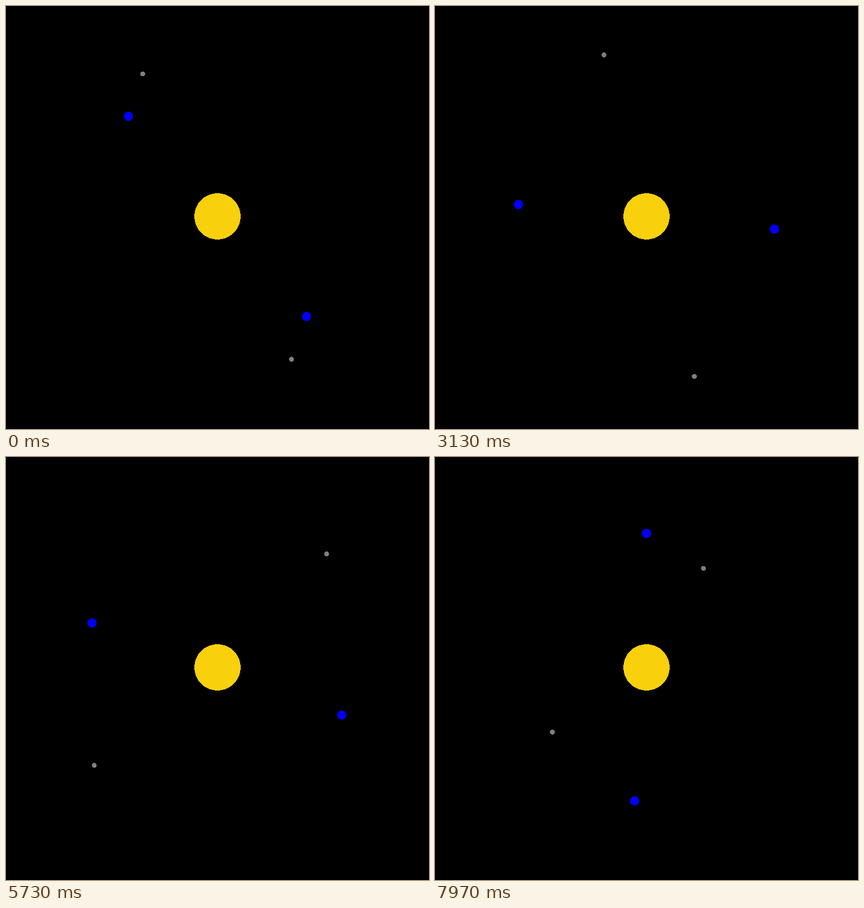
Write an HTML page that moves like this. It is 748 by 748 pixels and loops after 8000 ms.

```html
<!DOCTYPE html>
<html lang="en">
<head>
<meta charset="utf-8">
<title>Orbits</title>
<style>
  html, body { margin: 0; height: 100%; overflow: hidden; background: #000; }
  svg { display: block; width: 100%; height: 100%; }
</style>
</head>
<body>
<svg viewBox="0 0 748 748" shape-rendering="crispEdges">
  <circle cx="374" cy="372" r="41" fill="#f8d00c"/>
</svg>
<script>
const LOOP = 8000;
const TAU = 2 * Math.PI;
const SUN = { x: 374, y: 372 };
const MOON_NEAR = 176;

// Planet: time and angle (degrees).
const planetKeys = [
  [0, -131.7], [1070, -269.2], [3130, -534.7], [4570, -721.8],
  [5730, -880.5], [7070, -1051.4], [7970, -1170]
];

// Moon: time, angle and radius at each farthest point of its rosette.
const moonKeys = [
  [-1880, 327, 295], [200, -146, 295], [1500, -363.5, 295], [3005, -633.4, 303],
  [4570, -903.1, 304], [5888, -1144.5, 293], [7265, -1392, 282], [9369, -1778, 282]
];

const mix = (a, b, u) => a + (b - a) * u;

function segment(keys, t) {
  const next = keys.findIndex(([time]) => time > t);
  const i = (next < 0 ? keys.length : next) - 1;
  const from = keys[Math.min(i, keys.length - 2)];
  const to = keys[Math.min(i + 1, keys.length - 1)];
  return [from, to, (t - from[0]) / (to[0] - from[0])];
}

function planet(t) {
  const [from, to, u] = segment(planetKeys, t);
  return { radius: 232 + 5 * Math.cos(TAU * t / 2000), angle: mix(from[1], to[1], u) };
}

// Dips towards the sun once between far points, turning faster when near.
function moon(t) {
  const [from, to, u] = segment(moonKeys, t);
  const far = mix(from[2], to[2], u);
  const height = (1 + Math.cos(TAU * u)) / 2;
  const turn = u - 0.064 * Math.sin(TAU * u);
  return { radius: mix(MOON_NEAR, far, height), angle: mix(from[1], to[1], turn) };
}

// The opposite twins slowly fall out of symmetry.
const drift = t => 0.344 * Math.exp(t / 1850);

function addBody(orbit, size, color, offset) {
  const dot = document.createElementNS("http://www.w3.org/2000/svg", "circle");
  dot.setAttribute("r", size);
  dot.setAttribute("fill", color);
  document.querySelector("svg").append(dot);
  return { dot, orbit, offset };
}

const bodies = [
  addBody(planet, 8.2, "#0000f5", () => 0),
  addBody(planet, 8.2, "#0000f5", t => 180 + 0.2 * drift(t)),
  addBody(moon, 4.3, "#808080", () => 0),
  addBody(moon, 4.3, "#808080", t => 180 + drift(t))
];

// Thirty steps a second, shown on a 10 ms clock.
function stepTime(t) {
  const step = Math.floor((Math.floor(t / 10) * 10 + 5) * 0.03);
  return Math.round(step * 10 / 3) * 10;
}

function draw(now) {
  const t = stepTime(now % LOOP);
  for (const { dot, orbit, offset } of bodies) {
    const { radius, angle } = orbit(t);
    const turn = (angle + offset(t)) * TAU / 360;
    dot.setAttribute("cx", SUN.x + radius * Math.cos(turn));
    dot.setAttribute("cy", SUN.y + radius * Math.sin(turn));
  }
}

const start = performance.now();
function tick() {
  draw(performance.now() - start);
  requestAnimationFrame(tick);
}
tick();
</script>
</body>
</html>
```
